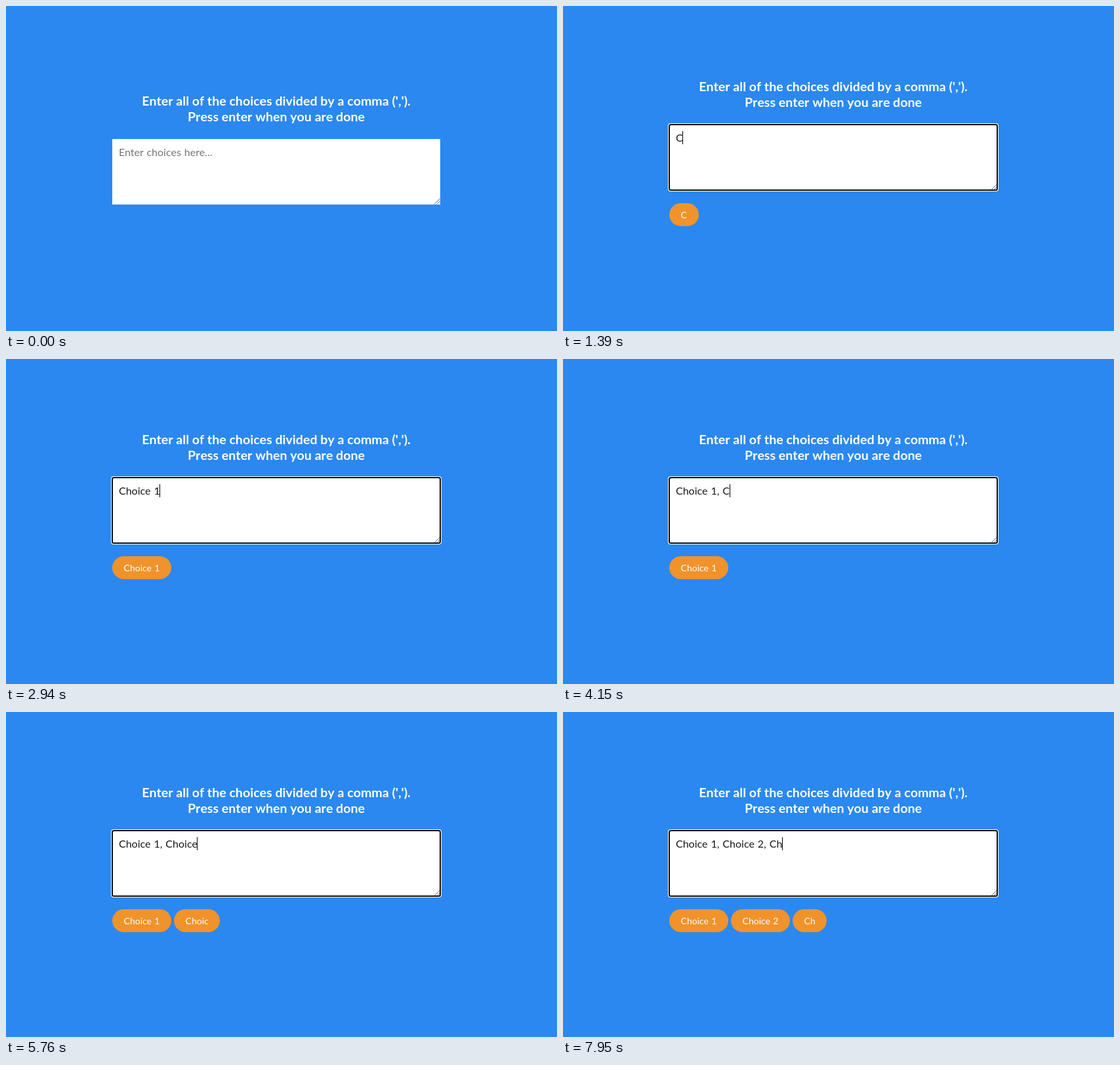
Write an HTML page that moves like this. It is 840 px wide and 496 px high and loops after 8 s.

```html
<!DOCTYPE html>
<html lang="en">
<head>
<meta charset="utf-8">
<title>Choice picker</title>
<style>
  html, body { margin: 0; width: 100%; height: 100%; overflow: hidden; background: #2b88f0; }
  svg { display: block; width: 840px; height: 496px; }
  text { font-family: Lato, "Open Sans", sans-serif; white-space: pre; }
  .title { font-size: 19.6px; font-weight: 700; font-kerning: none; fill: #fff; text-anchor: middle; }
  .field { font-size: 16px; word-spacing: .056em; }
  .chip { font-size: 14px; word-spacing: .056em; fill: #fff; }
</style>
</head>
<body>
<svg viewBox="0 0 840 496">
  <rect width="840" height="496" fill="#2b88f0"/>
  <g id="form">
    <text class="title" x="412" y="152">Enter all of the choices divided by a comma (',').</text>
    <text class="title" x="412" y="176">Press enter when you are done</text>
    <rect x="162" y="203" width="500" height="100" fill="#fff"/>
    <path d="M653 302.5 L661.5 294 M657 302.5 L661.5 298" fill="none" stroke="#555"/>
    <g id="ring" fill="none" stroke-width="2">
      <rect x="161" y="202" width="502" height="102" rx="3" stroke="#fff"/>
      <rect x="162" y="203" width="500" height="100" rx="2.5" stroke="#101010"/>
    </g>
    <text id="field" class="field" x="172" y="229" xml:space="preserve"></text>
    <rect id="caret" y="213" width="1" height="20" fill="#000"/>
  </g>
  <g id="chips"></g>
</svg>
<script>
  const LOOP = 8000, FOCUS = 400, BLINK = 530, LAG = 70;
  const PAD = 17.6, GAP = 4;

  // [time, field value, delay before the chips follow]
  const keys = [];
  const type = (base, ...steps) => {
    for (const [time, text, lag = LAG] of steps) keys.push([time, base + text, lag]);
  };
  type('', [1320, 'C'], [1650, 'Ch'], [1830, 'Cho'], [1980, 'Choi'], [2130, 'Choic'], [2330, 'Choice'],
    [2600, 'Choice '], [2870, 'Choice 1'], [3490, 'Choice 1,'], [3690, 'Choice 1, ']);
  type('Choice 1, ', [4150, 'C'], [4350, 'Ch'], [4750, 'Chi'], [5020, 'Ch'], [5280, 'Cho'], [5480, 'Choi'],
    [5550, 'Choic'], [5760, 'Choice', 130], [6370, 'Choice '], [6560, 'Choice 2'], [7160, 'Choice 2,'],
    [7360, 'Choice 2, ']);
  type('Choice 1, Choice 2, ', [7560, 'C'], [7880, 'Ch']);

  const get = id => document.getElementById(id);
  const form = get('form'), ring = get('ring'), field = get('field'), caret = get('caret');
  const show = (node, on) => node.setAttribute('visibility', on ? 'visible' : 'hidden');

  function add(parent, tag, attrs) {
    const node = document.createElementNS('http://www.w3.org/2000/svg', tag);
    for (const name in attrs) node.setAttribute(name, attrs[name]);
    return parent.appendChild(node);
  }

  const chips = [0, 1, 2].map(() => ({
    pill: add(get('chips'), 'rect', { y: 301, height: 35, rx: 17.5, fill: '#f0932b' }),
    label: add(get('chips'), 'text', { class: 'chip', y: 324 })
  }));

  function drawField(t) {
    const key = keys.findLast(k => t >= k[0]);
    const value = key ? key[1] : '';
    field.textContent = value || 'Enter choices here...';
    field.setAttribute('fill', value ? '#1a1a1a' : '#757575');
    const width = value ? field.getComputedTextLength() : 0;
    caret.setAttribute('x', Math.floor(172 + width));
    const since = t - (key ? key[0] : FOCUS);
    show(caret, t >= FOCUS && Math.floor(since / BLINK) % 2 === 0);
    show(ring, t >= FOCUS);
  }

  function drawChips(t) {
    const key = keys.findLast(k => t >= k[0] + k[2]);
    const names = (key ? key[1] : '').split(',').map(s => s.trim()).filter(Boolean);
    let x = 162;
    chips.forEach(({ pill, label }, i) => {
      const on = i < names.length;
      show(pill, on);
      show(label, on);
      if (!on) return;
      label.textContent = names[i];
      const width = Math.round(label.getComputedTextLength() + 2 * PAD);
      pill.setAttribute('x', x);
      pill.setAttribute('width', width);
      label.setAttribute('x', x + PAD);
      x += width + GAP;
    });
    // The first chip pushes the centred form up.
    form.setAttribute('transform', `translate(0 ${names.length ? -22 : 0})`);
  }

  function draw(now) {
    const t = now % LOOP;
    drawField(t);
    drawChips(t);
  }

  const start = performance.now();
  function tick() {
    draw(performance.now() - start);
    requestAnimationFrame(tick);
  }
  tick();
</script>
</body>
</html>
```
